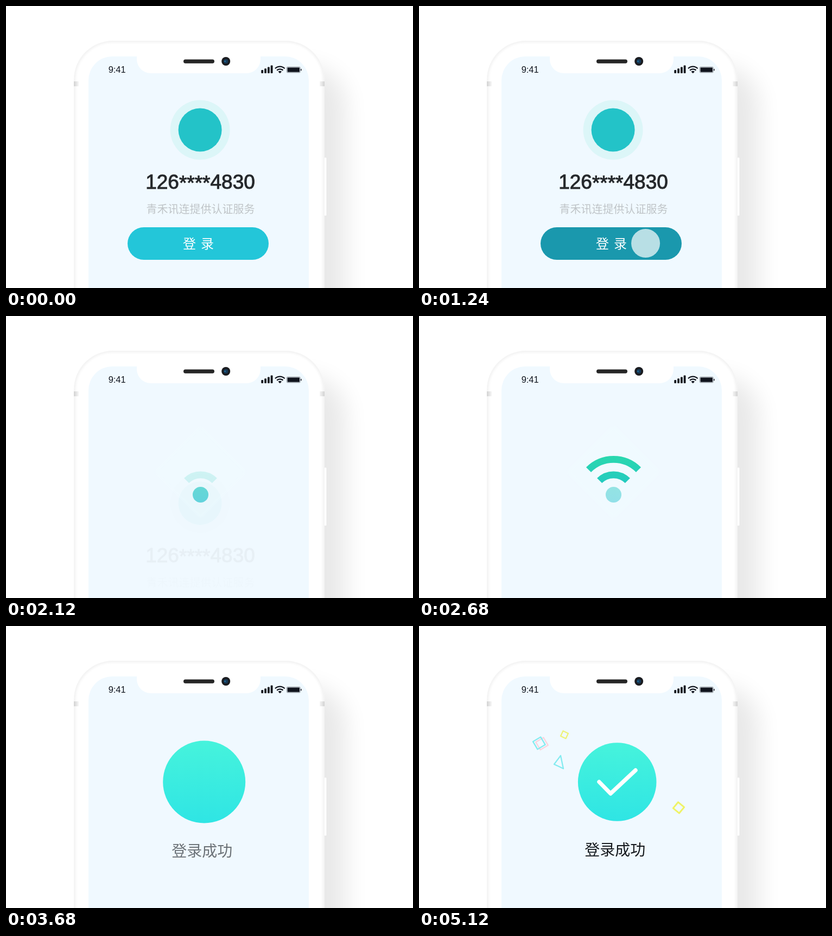
Recreate the animation shown at these times as an HTML page. Size 750 px wide and 520 px high, loop 5.16 s.

```html
<!DOCTYPE html>
<html lang="zh-CN">
<head>
<meta charset="utf-8">
<title>一键登录</title>
<style>
html, body { margin: 0; width: 100%; height: 100%; overflow: hidden; background: #fff; }
svg { display: block; width: 750px; height: 520px; }
.cjk { font-family: "Noto Sans CJK SC", "Noto Sans CJK", sans-serif; text-anchor: middle; }
.latin { font-family: "Liberation Sans", Arial, sans-serif; }
.line { fill: none; stroke-linejoin: round; }
</style>
</head>
<body>
<svg viewBox="0 0 750 520">
  <defs>
    <filter id="blur" x="-40%" y="-40%" width="180%" height="180%"><feGaussianBlur stdDeviation="22"/></filter>
    <filter id="soft" x="-10%" y="-10%" width="120%" height="120%"><feGaussianBlur stdDeviation="2"/></filter>
    <linearGradient id="mint" x2="0" y2="1">
      <stop stop-color="#46f3dc"/><stop offset="1" stop-color="#2fe5e4"/>
    </linearGradient>
    <linearGradient id="signal" gradientUnits="userSpaceOnUse" x1="0" y1="258" x2="0" y2="344">
      <stop stop-color="#2ad8ae"/><stop offset="1" stop-color="#1fc0cc"/>
    </linearGradient>
    <linearGradient id="band"><stop stop-color="#d2d2d2"/><stop offset="1" stop-color="#f6f6f6"/></linearGradient>
    <clipPath id="bodyClip"><rect x="125" y="64" width="462" height="560" rx="72"/></clipPath>
  </defs>

  <!-- phone -->
  <rect x="300" y="112" width="326" height="560" rx="70" opacity=".085" filter="url(#blur)"/>
  <rect x="583" y="279" width="8" height="108" rx="1.5" fill="#fff" stroke="#e2e2e2" stroke-width=".8"/>
  <rect x="125" y="64" width="462" height="560" rx="72" fill="#fff"/>
  <g clip-path="url(#bodyClip)">
    <rect x="125" y="64" width="462" height="560" rx="72" class="line" stroke="#f1f1f1" stroke-width="6" filter="url(#soft)"/>
    <rect x="125" y="139" width="9" height="9" fill="url(#band)"/>
    <rect x="578" y="139" width="9" height="9" fill="url(#band)" transform="rotate(180 582.5 143.5)"/>
  </g>
  <path fill="#f0f9ff" d="M152 520V137a44 44 0 0 1 44-44H241V98a26 26 0 0 0 26 26H443a26 26 0 0 0 26-26V93H514a44 44 0 0 1 44 44V520Z"/>
  <rect x="327" y="98.5" width="57" height="7.2" rx="3.6" fill="#262626"/>
  <circle cx="405.2" cy="102" r="8" fill="#1b1c20"/>
  <circle cx="405.2" cy="102" r="4" fill="#163a58"/>
  <circle cx="403.6" cy="102" r="1.3" fill="#2374a8"/>

  <!-- status bar -->
  <g fill="#10141d">
    <text class="latin" x="188.7" y="123" font-size="16.4">9:41</text>
    <rect x="470.3" y="118" width="3.8" height="6" rx="1"/>
    <rect x="476.2" y="115.2" width="3.8" height="8.8" rx="1"/>
    <rect x="482" y="112.4" width="3.8" height="11.6" rx="1"/>
    <rect x="487.7" y="109.5" width="3.8" height="14.5" rx="1"/>
    <path d="M504.8 124.2l-3.2-3.2a4.6 4.6 0 0 1 6.4 0Z"/>
    <path class="line" stroke="#10141d" stroke-width="2.3" d="M496 115.3a12.6 12.6 0 0 1 17.6 0M499.2 118.6a8 8 0 0 1 11.2 0"/>
    <rect x="517.4" y="112.4" width="24.8" height="10.4" rx="1.5" fill="none" stroke="#7d838a" stroke-width=".9"/>
    <rect x="518.6" y="113.5" width="22.4" height="8.2" rx=".8"/>
    <rect x="543" y="115.8" width="1.5" height="3.6" rx=".7"/>
  </g>

  <!-- login form -->
  <g id="login">
    <circle cx="357.6" cy="228.5" r="55" fill="#dcf6f8"/>
    <circle cx="357.6" cy="228.5" r="40" fill="#23c3c8"/>
    <text class="latin" x="358" y="337" font-size="37" text-anchor="middle" fill="#25282b" stroke="#25282b" stroke-width="1">126<tspan dy="2">****</tspan><tspan dy="-2">4830</tspan></text>
    <text class="cjk" x="358.5" y="382" font-size="20" fill="#bfc4c7">青禾讯连提供认证服务</text>
    <rect id="button" x="224" y="408" width="260" height="60" rx="30"/>
    <text class="cjk" x="355.3" y="447" font-size="24" letter-spacing="1.8" fill="#fff">登 录</text>
    <circle id="touch" cx="417.6" cy="437.5" r="26.5" fill="#fff"/>
  </g>

  <!-- signal -->
  <rect id="glow" x="298" y="227" width="121" height="121" fill="#f0fdff" transform="rotate(45 358.5 287.5)" filter="url(#soft)"/>
  <g id="wifi" class="line" stroke="url(#signal)" stroke-width="12.8">
    <circle id="dot" cx="358.5" cy="329.5" r="14.5" fill="url(#signal)" stroke="none"/>
    <path id="inner" d="M332.6 303.6a36.6 36.6 0 0 1 51.8 0"/>
    <path id="outer" d="M312.5 283.5a65 65 0 0 1 92 0"/>
  </g>

  <!-- success -->
  <g id="confetti" class="line"></g>
  <circle id="disc" cx="365.2" cy="287.5" fill="url(#mint)"/>
  <path id="check" class="line" d="M332 287.5L353 309L399 266" stroke="#fff" stroke-width="7.4" stroke-linecap="round" pathLength="100" stroke-dasharray="100 200"/>
  <text id="done" class="cjk" x="361.3" y="422.5" font-size="28" fill="#14181c">登录成功</text>
</svg>
<script>
const LOOP = 5160, STEP = 40, CENTER = [365.2, 287.5];
const el = id => document.getElementById(id);
const set = (node, attrs) => {
  for (const name in attrs) node.setAttribute(name, attrs[name]);
};

// Each track lists [time in ms, value]; values between are linear.
const tracks = {
  press: [[1000, 0], [1080, 1], [1240, 1], [1480, 0]],
  touch: [[600, 0], [880, .7], [1240, .69], [1480, 0]],
  login: [[1720, 1], [1760, .495], [1880, .2], [2040, .06], [2280, 0]],
  glow: [[1760, 0], [2280, .4], [3160, .4], [3680, 0]],
  wifi: [[3120, 1], [3320, 0]],
  dot: [[1960, 0], [2200, 1], [2560, 1], [2680, .45], [2720, .35], [2840, 1]],
  inner: [[2080, 0], [2320, 1], [2680, 1], [2840, .35], [2960, 1]],
  outer: [[2200, 0], [2440, 1], [2800, 1], [2960, .35], [3080, 1]],
  disc: [[3160, 0], [3400, 50], [3600, 77.5], [3680, 76], [3840, 70], [4040, 73], [4400, 71], [4760, 73], [5120, 72.3]],
  check: [[3720, 0], [4040, 100]],
  doneY: [[3320, 30], [3520, 10], [3680, 2], [3840, 0]],
  done: [[3320, 0], [3680, .6], [3880, 1]],
  bits: [[4000, 0], [4200, .6], [4400, .8], [4800, 1]]
};

function value(name, t) {
  const keys = tracks[name];
  const next = keys.findIndex(key => key[0] > t);
  if (next === 0) return keys[0][1];
  if (next < 0) return keys[keys.length - 1][1];
  const [t0, a] = keys[next - 1], [t1, b] = keys[next];
  return a + (b - a) * (t - t0) / (t1 - t0);
}

const square = side => `M${-side / 2} ${-side / 2}h${side}v${side}h${-side}Z`;
// spin is the turn in degrees made during the last 720 ms
const bits = [
  { d: square(16.5), color: '#fbd3dd', width: 2.4, end: [226.5, 217], time: 540, turn: -31, spin: -3 },
  { d: square(16.5), color: '#84ebf0', width: 2.4, end: [221.3, 216], time: 540, turn: -31, spin: -3 },
  { d: square(10.5), color: '#eef277', width: 2.3, end: [268, 200.5], time: 790, turn: 25, spin: 25 },
  { d: 'M3 -12L-9 4L8 12Z', color: '#84ebf0', width: 2.3, end: [258, 251], time: 790, turn: 0, spin: 32 },
  { d: square(14.5), color: '#eff366', width: 3, end: [478.5, 335], time: 540, turn: 40, spin: 44 }
];
for (const bit of bits) {
  bit.node = document.createElementNS('http://www.w3.org/2000/svg', 'path');
  set(bit.node, { d: bit.d, stroke: bit.color, 'stroke-width': bit.width });
  el('confetti').append(bit.node);
}

function moveBit(bit, t) {
  const x = Math.min(1, Math.max(0, (t - 4000) / bit.time));
  const eased = 1 - (1 - x) ** 3;
  const [px, py] = CENTER.map((c, i) => c + (bit.end[i] - c) * eased);
  const angle = bit.turn + bit.spin * (t - 5120) / 720;
  set(bit.node, { transform: `translate(${px} ${py}) rotate(${angle})` });
}

function draw(t) {
  const at = name => value(name, t);
  const mix = (a, b) => a + (b - a) * at('press');
  set(el('button'), { fill: `rgb(${mix(35, 26)} ${mix(198, 152)} ${mix(217, 173)})` });
  set(el('login'), { opacity: at('login'), transform: `translate(0 ${121.5 * (1 - at('login'))})` });
  for (const id of ['touch', 'glow', 'wifi', 'dot', 'inner', 'outer']) set(el(id), { opacity: at(id) });
  set(el('disc'), { r: at('disc') });
  set(el('check'), { 'stroke-dashoffset': 100 - at('check'), opacity: at('check') > 0 ? 1 : 0 });
  set(el('done'), { opacity: at('done'), transform: `translate(0 ${at('doneY')})` });
  set(el('confetti'), { opacity: at('bits') });
  bits.forEach(bit => moveBit(bit, t));
}

const start = performance.now();
function tick(now) {
  const t = Math.max(0, now - start) % LOOP;
  draw(Math.floor(t / STEP) * STEP);
  requestAnimationFrame(tick);
}
draw(0);
requestAnimationFrame(tick);
</script>
</body>
</html>
```
